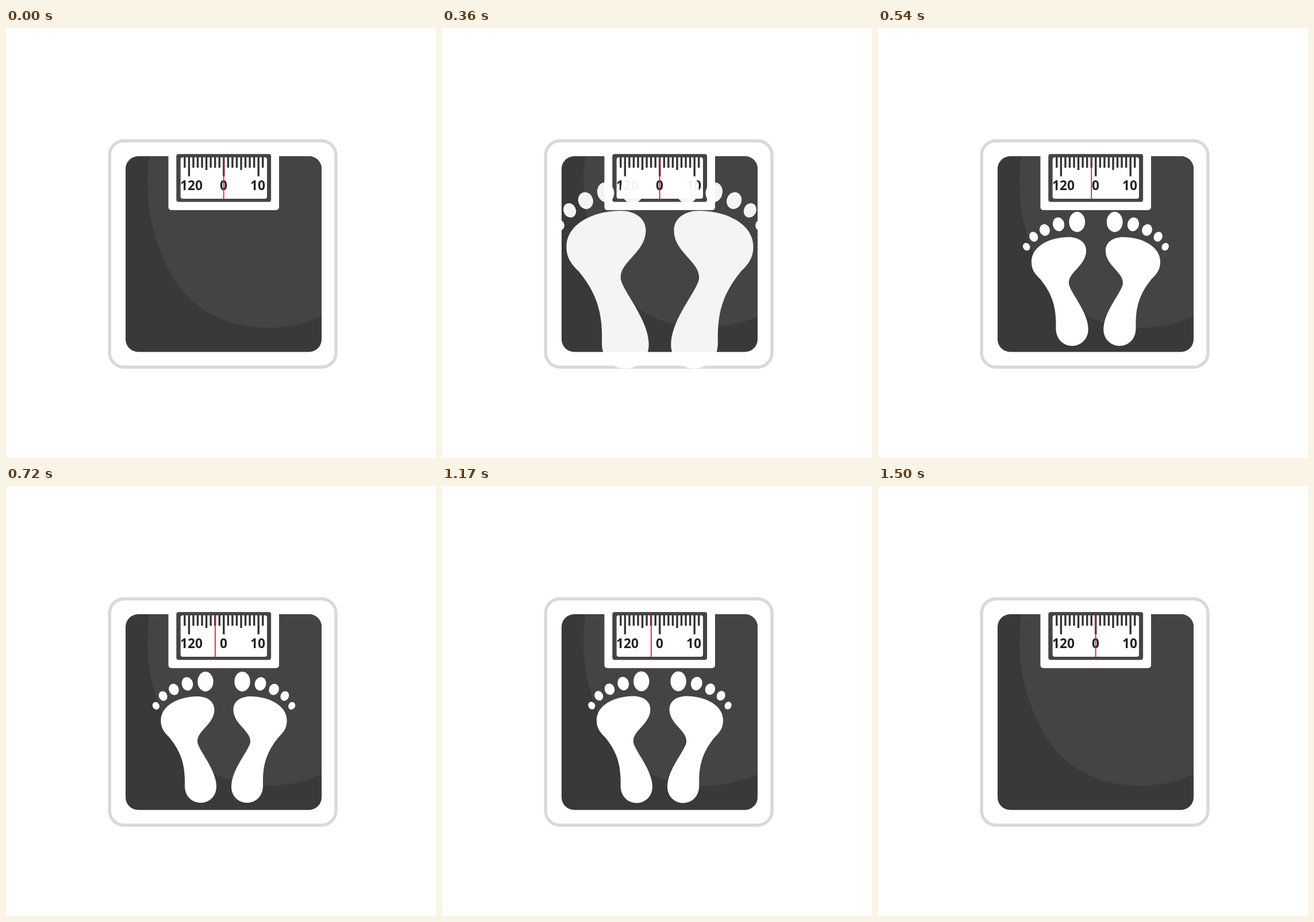
These frames come from a looping animation (748x748 px, 1.83 s). An HTML page:

```html
<!DOCTYPE html>
<html lang="en">
<head>
<meta charset="utf-8">
<title>Bathroom scale</title>
<style>
  html, body { margin: 0; height: 100%; overflow: hidden; background: #fff; }
  svg { display: block; width: 100vw; height: 100vh; }
  text {
    font: 800 31px "Noto Sans", "Open Sans", sans-serif;
    font-stretch: extra-condensed;
    text-anchor: middle;
    fill: #222;
  }
</style>
</head>
<body>
<svg viewBox="0 0 748 748">
  <defs>
    <clipPath id="mat"><rect x="208" y="223" width="341" height="340.5" rx="22"/></clipPath>
    <g id="foot">
      <path d="M269.5 408C269.5 382 300 366 333 366C350 366 362.5 375 362.5 389C362.5 414 333 425 333 444
        C333 458 366 492 366 523C366 540 353 551 339 551C323 551 311 539 311 521
        C312 487 306 464 284 437C276 429 269.5 422 269.5 408Z"/>
      <ellipse cx="347" cy="340.3" rx="13.6" ry="17.2"/>
      <ellipse cx="315.5" cy="344.3" rx="9.8" ry="11.8" transform="rotate(-14 315.5 344.3)"/>
      <ellipse cx="292" cy="354" rx="8.6" ry="10" transform="rotate(-20 292 354)"/>
      <ellipse cx="273.3" cy="365.4" rx="7.2" ry="8.6" transform="rotate(-25 273.3 365.4)"/>
      <ellipse cx="261" cy="382.4" rx="5.8" ry="6.8" transform="rotate(-30 261 382.4)"/>
    </g>
  </defs>

  <rect x="180.2" y="196.2" width="393.8" height="393.8" rx="25" fill="#fff" stroke="#d9d9d9" stroke-width="5.5"/>
  <g clip-path="url(#mat)">
    <rect x="208" y="223" width="341" height="341" fill="#393939"/>
    <path fill="#444" d="M249.5 223Q246 245 246 270C246 360 285 432 310 461C345 501 400 521.5 455 521.5C490 521.5 523 513 549 501.5V223Z"/>
  </g>
  <rect x="282.5" y="205" width="192.5" height="111.7" rx="5" fill="#fff"/>
  <rect x="296.3" y="219.3" width="164.8" height="83.2" rx="4" fill="#444"/>
  <rect x="303.7" y="225" width="150.3" height="72" rx="4" fill="#fff"/>
  <path id="ticks" stroke="#333" stroke-width="3.4"/>
  <g id="labels">
    <text x="322.5">120</text>
    <text x="378.5">0</text>
    <text x="438">10</text>
  </g>
  <g id="feet" fill="#fff">
    <use href="#foot"/>
    <use href="#foot" transform="matrix(-1 0 0 1 758 0)"/>
  </g>
  <path id="needle" d="M378.7 225V298.5" stroke="#e3131b" stroke-width="1.7"/>
</svg>
<script>
const LOOP = 1830, STEP = 30;
const $ = id => document.getElementById(id);
const clamp = (v, lo = 0, hi = 1) => Math.min(hi, Math.max(lo, v));
const smooth = (a, b, t) => { const u = clamp((t - a) / (b - a)); return u * u * (3 - 2 * u); };

let ticks = "";
for (let i = -9; i <= 9; i++) {
  const length = i % 8 === 0 ? 33 : i % 4 === 0 ? 22 : 18;
  ticks += `M${378.8 + i * 7.55} 225v${length}`;
}
$("ticks").setAttribute("d", ticks);

// Pick a type size that keeps the widest label inside the window
const labels = [...$("labels").children];
const size = Math.min(31, 31 * 39 / labels[0].getComputedTextLength());
for (const label of labels) {
  label.style.fontSize = size + "px";
  label.setAttribute("y", 274 + size * 0.357);
}

function draw(now) {
  const t = Math.floor(now % LOOP / STEP) * STEP;
  const grow = 0.484 * Math.exp((360 - t) * 0.0169) + 0.151 * Math.exp((t - 1380) * 0.0162);
  const scale = 1 + Math.min(0.575, grow);
  const fade = 0.055 * 4 ** ((360 - t) / 30) + 0.015 * 4 ** ((t - 1380) / 30);
  $("feet").setAttribute("transform", `translate(379 465) scale(${scale}) translate(-379 -465)`);
  $("feet").setAttribute("opacity", clamp(1 - fade));

  const swing = smooth(360, 720, t) - smooth(1320, 1500, t);
  $("needle").setAttribute("transform", `translate(${-14.8 * swing} 0)`);
}

function tick() {
  draw(performance.now());
  requestAnimationFrame(tick);
}
tick();
</script>
</body>
</html>
```
